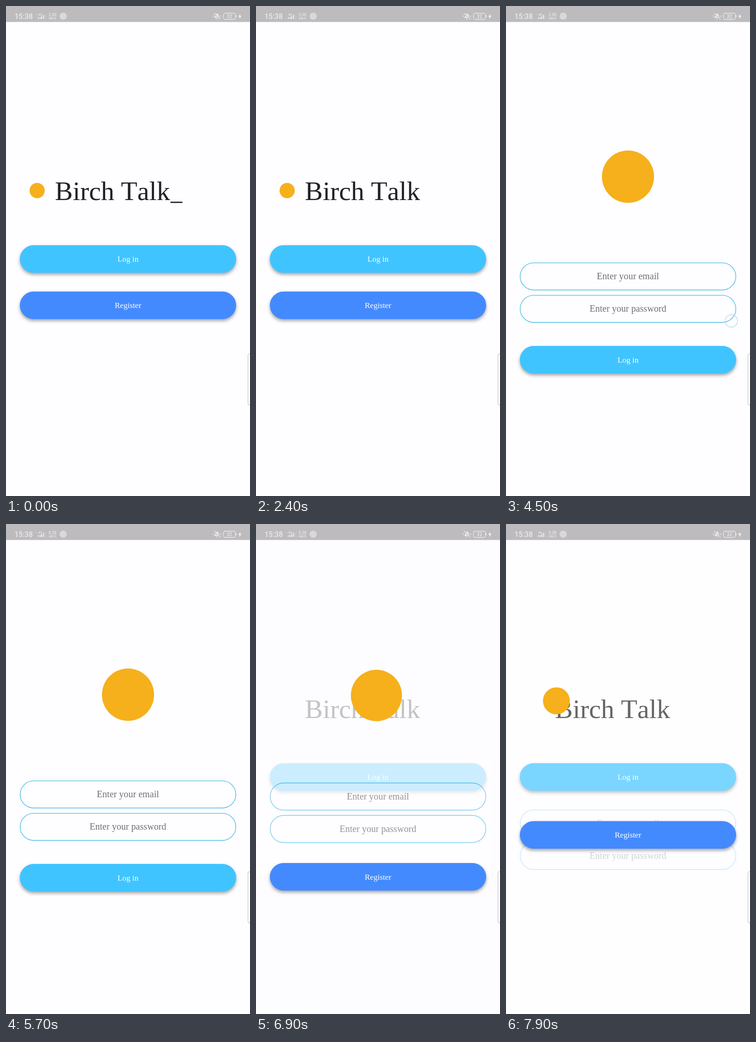
Write an HTML page that moves like this. It is 529 px wide and 1058 px high and loops after 8000 ms.

```html
<!DOCTYPE html>
<html lang="en">
<head>
<meta charset="utf-8">
<title>Chat welcome</title>
<style>
  html, body { margin: 0; width: 100%; height: 100%; overflow: hidden; background: #fefdff; }
  svg { display: block; width: 100%; height: 100%; }
  text { font-family: "Liberation Serif", Tinos, serif; text-anchor: middle; font-kerning: none; }
  .title { font-size: 58px; text-anchor: start; fill: #222225; }
  .button { filter: drop-shadow(0 4px 3.5px rgba(0, 0, 0, .35)); }
  .label { font-size: 17.3px; fill: #fff; }
  .field rect { fill: none; stroke: #4dbde4; stroke-width: 1.4; }
  .field text { font-size: 20.1px; fill: #707072; }
  .status text { font-family: Roboto, sans-serif; fill: #ebeaeb; font-weight: 500; }
</style>
</head>
<body>
<svg viewBox="0 0 529 1058">
  <rect width="529" height="1058" fill="#fefdff"/>

  <g id="welcome">
    <text class="title" x="106" y="419">Birch Talk</text>
    <rect id="cursor" x="356.5" y="422.5" width="26" height="2.8" fill="#222225"/>
  </g>

  <g id="form">
    <rect width="529" height="1058" fill="#fefdff"/>
    <g class="field">
      <rect x="30.7" y="554.6" width="467.6" height="58.6" rx="29.3"/>
      <text x="264.3" y="590">Enter your email</text>
    </g>
    <g class="field" transform="translate(0 70)">
      <rect x="30.7" y="554.6" width="467.6" height="58.6" rx="29.3"/>
      <text x="264.3" y="590">Enter your password</text>
    </g>
  </g>

  <g id="flight"><circle id="logo" fill="#f5b01b"/></g>

  <rect x="524.6" y="750.6" width="12" height="111" rx="4" fill="#fff" stroke="#c6c5c7" stroke-width="1.3"/>
  <circle id="touch" cx="488.5" cy="680" r="13.5" fill="none" stroke="#c3d9e6" stroke-width="1.5"/>

  <g class="status">
    <rect width="529" height="34.5" fill="#bdbbbd"/>
    <text x="38.3" y="28" font-size="15.6">15:38</text>
    <text id="activity" x="65.5" y="20" font-size="6">▪</text>
    <text x="74" y="20.5" font-size="6.5">4G</text>
    <path d="M70.5 28v-4M74.5 28v-4M77.5 28v-6M81.5 28v-9" stroke="#ebeaeb" stroke-width="2.3"/>
    <path d="M86.5 18v10" stroke="#dddcdd" stroke-width="1" stroke-dasharray="2 2"/>
    <text id="speed" x="101" y="21.5" font-size="8.5"></text>
    <text x="101" y="28.5" font-size="7">KB/S</text>
    <circle cx="124" cy="22" r="7.8" fill="#dad9da"/>
    <path d="M451.5 26c2-2 1.5-9 6-10 4.5 1 4 8 6 10zM455.5 27.5h4l-2 2z" fill="#ebeaeb"/>
    <path d="M450 15l15 14" stroke="#bdbbbd" stroke-width="3"/>
    <path d="M451 15l14 14M449.5 20v4M465.5 20v4" stroke="#ebeaeb" stroke-width="1.3"/>
    <rect x="471.5" y="15.5" width="26" height="13.5" rx="4" fill="none" stroke="#ebeaeb" stroke-width="1.4"/>
    <path d="M499 20v4.5" stroke="#ebeaeb" stroke-width="1.5"/>
    <text x="484.5" y="26" font-size="10">32</text>
    <path d="M508.5 17l-5 6h3l-1 5 5-6.5h-3z" fill="#f6f5f6"/>
  </g>
</svg>
<script>
const $ = id => document.getElementById(id);
const LOOP = 8000, FRAME = 100, HEIGHT = 1058, TRANSITION = 300;
const FORM_BUTTON_Y = 734;
const BUTTONS = {
  login: { label: 'Log in', color: '#40c4ff', y: 516.5 },
  register: { label: 'Register', color: '#448aff', y: 616.5 },
};
const LOGO_SMALL = { x: 67.5, y: 398.5, r: 16.5 };
const LOGO_LARGE = { x: 264.5, y: 368.5, r: 56.5 };

const clamp = x => Math.min(1, Math.max(0, x));
const mix = (a, b, k) => a + (b - a) * k;
const show = (node, on) => node.setAttribute('visibility', on ? 'visible' : 'hidden');
const moveY = (node, y) => node.setAttribute('transform', `translate(0 ${y})`);

// CSS-style cubic bezier, solved by bisection
function bezier(x1, y1, x2, y2) {
  const at = (a, b, s) => 3 * a * s * (1 - s) ** 2 + 3 * b * s * s * (1 - s) + s ** 3;
  return x => {
    if (x <= 0 || x >= 1) return clamp(x);
    let lo = 0, hi = 1;
    for (let i = 0; i < 24; i++) {
      const mid = (lo + hi) / 2;
      if (at(x1, x2, mid) < x) lo = mid; else hi = mid;
    }
    return at(y1, y2, lo);
  };
}
const fastOutSlowIn = bezier(.4, 0, .2, 1);
const easeIn = bezier(.42, 0, 1, 1);

function addButton(parent, { label, color }) {
  const g = document.createElementNS('http://www.w3.org/2000/svg', 'g');
  g.innerHTML = `<rect class="button" x="30" width="469" height="59.5" rx="29.75" fill="${color}"/>
    <text class="label" x="264.5" y="35.7">${label}</text>`;
  parent.append(g);
  return g;
}
for (const b of Object.values(BUTTONS)) {
  b.resting = addButton($('welcome'), b);
  b.flying = addButton($('flight'), b);
  moveY(b.resting, b.y);
}

// Which form is in play, whether it is opening, and how far it is open
function route(t) {
  const since = start => clamp((t - start) / TRANSITION);
  if (t < 2800) return ['login', true, 0];
  if (t < 5900) return ['login', true, 1];
  if (t < 6200) return ['login', false, 1 - since(5739)];
  if (t < 7500) return ['register', true, since(6651)];
  return ['register', false, 1 - since(7747)];
}

function draw(t) {
  const [active, opening, open] = route(t);
  const form = $('form');
  form.setAttribute('opacity', easeIn(open));
  moveY(form, HEIGHT / 4 * (1 - fastOutSlowIn(open)));

  // The logo follows an arc, so height and size lag behind the sideways move
  const travel = fastOutSlowIn(opening ? open : 1 - open);
  const amount = power => opening ? travel ** power : 1 - travel ** power;
  const logo = (key, power) => mix(LOGO_SMALL[key], LOGO_LARGE[key], amount(power));
  $('logo').setAttribute('cx', logo('x', 1));
  $('logo').setAttribute('cy', logo('y', 3.4));
  $('logo').setAttribute('r', logo('r', 1.6));

  for (const [name, b] of Object.entries(BUTTONS)) {
    show(b.resting, name !== active);
    show(b.flying, name === active);
    moveY(b.flying, mix(b.y, FORM_BUTTON_Y, amount(1)));
  }

  const blinks = [200, 500, 700, 1000, 1200].filter(time => t >= time).length;
  show($('cursor'), blinks % 2 === 0);
  show($('touch'), t >= 4300 && t < 4700);
  show($('activity'), t < 2400 || (t >= 3900 && t < 7500));
  $('speed').textContent = t < 5500 ? '2.00' : '0.28';
}

const start = performance.now();
function tick() {
  const t = (performance.now() - start) % LOOP;
  draw(Math.floor(t / FRAME) * FRAME);
  requestAnimationFrame(tick);
}
tick();
</script>
</body>
</html>
```
